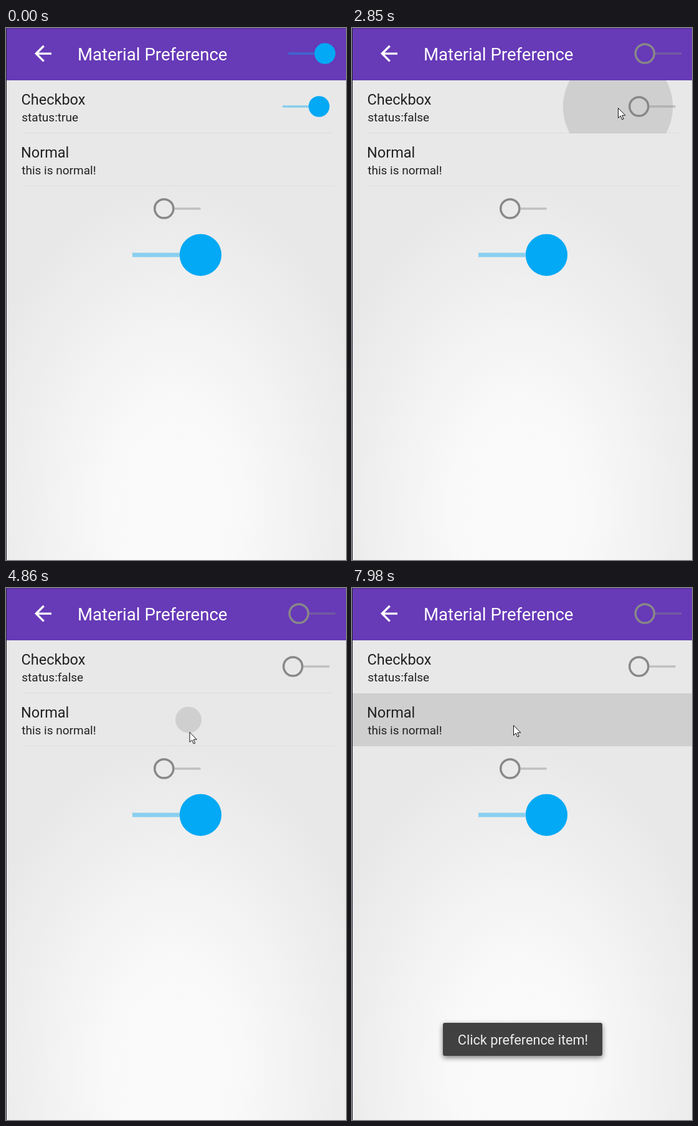
An HTML page that plays this animation: 546x854 px, repeating every 8000 ms.

```html
<!DOCTYPE html>
<html lang="en">
<head>
<meta charset="utf-8">
<title>Material Preference</title>
<style>
  html, body { margin: 0; width: 100%; height: 100%; overflow: hidden; }
  svg { display: block; }
  text { font-family: Roboto, sans-serif; fill: #212121; }
  .title { font-size: 23.5px; }
  .sub { font-size: 19px; }
  .divider { fill: #dedede; }
</style>
</head>
<body>
<svg id="stage" width="546" height="854" viewBox="0 0 546 854">
  <defs>
    <radialGradient id="glow" gradientUnits="userSpaceOnUse" cx="0" cy="0" r="520"
                    gradientTransform="translate(270 770) scale(.64 1)">
      <stop offset="0" stop-color="#fafafa"/>
      <stop offset=".32" stop-color="#f9f9f9"/>
      <stop offset="1" stop-color="#e8e8e8"/>
    </radialGradient>
    <filter id="shadow" x="-10%" y="-40%" width="120%" height="190%">
      <feDropShadow dx="0" dy="3" stdDeviation="4" flood-opacity=".55"/>
    </filter>
  </defs>

  <rect width="546" height="854" fill="url(#glow)"/>
  <rect width="546" height="84" fill="#673ab7"/>
  <rect width="546" height="2" fill="#5a34a3"/>
  <path transform="translate(39.2 20.8) scale(1.69)" fill="#fff"
        d="M20 11H7.83l5.59-5.59L12 4l-8 8 8 8 1.41-1.41L7.83 13H20z"/>
  <text x="115" y="52" style="font-size:27.6px;fill:#fff">Material Preference</text>

  <rect class="divider" x="25" y="168" width="499" height="1"/>
  <rect class="divider" x="25" y="253" width="499" height="1"/>
  <g id="ripples"></g>

  <text class="title" x="24.5" y="123">Checkbox</text>
  <text class="sub" x="25.3" y="149.5" id="status">status:true</text>
  <text class="title" x="24" y="208">Normal</text>
  <text class="sub" x="25.3" y="234.5">this is normal!</text>
  <g id="switches"></g>

  <g id="toast">
    <rect x="146" y="698" width="256" height="53" rx="3" fill="#313131" filter="url(#shadow)"/>
    <text x="274.5" y="733" text-anchor="middle" style="font-size:21.7px;fill:#ececec">Click preference item!</text>
  </g>
  <rect width="1" height="854" fill="#1c222c"/>
  <path id="cursor" d="M.5 .5V16.5L4.2 13L6.8 19L9.2 18L6.6 12.2H11.8Z" fill="#fff" stroke="#111" stroke-linejoin="round"/>
</svg>

<script>
const LOOP = 8000, FADE = 450, TOGGLE = 180;
const $ = id => document.getElementById(id);
const clamp = v => Math.max(0, Math.min(1, v));
const lerp = (a, b, p) => a + (b - a) * p;
const smooth = p => p * p * (3 - 2 * p);

function add(parent, tag, attrs = {}) {
  const el = document.createElementNS('http://www.w3.org/2000/svg', tag);
  set(el, attrs);
  parent.appendChild(el);
  return el;
}
function set(el, attrs) {
  for (const key in attrs) el.setAttribute(key, attrs[key]);
}

// Switches: left end, centre line, scale, initial state, toggle times
const rowToggles = [2040, 3200, 4120];
const switches = [
  { x: 453.5, y: 41, k: 1, on: true, times: [1110] },
  { x: 444, y: 126, k: 1, on: true, times: rowToggles },
  { x: 237, y: 290, k: 1, on: false, times: [] },
  { x: 203, y: 364.3, k: 2, on: true, times: [] }
];
for (const s of switches) {
  s.g = add($('switches'), 'g');
  s.track = add(s.g, 'path', { 'stroke-width': 3.5 * s.k, opacity: .42 });
  s.knob = add(s.g, 'circle', { cy: s.y, fill: 'none' });
}

function drawSwitch(s, t) {
  let on = s.on, p = +on;
  for (const start of s.times) {
    if (t < start) break;
    on = !on;
    const u = smooth(clamp((t - start) / TOGGLE));
    p = on ? u : 1 - u;
  }
  const R = 16.8 * s.k, right = s.x + (s.k === 2 ? 143 : 75.5);
  const cx = lerp(s.x + R, right - R, p);
  const width = lerp(3.5 * s.k, R, p);
  const mix = (a, b) => Math.round(lerp(a, b, p));
  s.g.setAttribute('stroke', `rgb(${mix(136, 3)},${mix(136, 169)},${mix(136, 244)})`);
  s.track.setAttribute('d', `M${s.x} ${s.y}H${cx - R}M${cx + R} ${s.y}H${right}`);
  set(s.knob, { cx, r: R - width / 2, 'stroke-width': width });
  return on;
}

// Ripples: row, centre, press time, release time
const ripples = [
  [0, 427, 2640, 3200], [0, 427, 3560, 4120],
  [1, 293, 4810, 5760], [1, 269.5, 5830, 5850], [1, 258, 6970, LOOP]
].map(([row, cx, press, release]) => {
  const box = add($('ripples'), 'svg', { x: 0, y: 84 + 85 * row, width: 546, height: 85 });
  return { row, press, release, el: add(box, 'circle', { cx, cy: 42.5 }) };
});
const dividers = document.querySelectorAll('.divider');

function drawRipples(t) {
  const busy = [false, false];
  for (const { row, press, release, el } of ripples) {
    const held = Math.max(0, Math.min(t, release) - press);
    const after = Math.max(0, t - release);
    const r = held * .42 + after * 1.04;
    const alpha = t < press ? 0 : .11 * (1 - clamp(after / FADE));
    set(el, { r, 'fill-opacity': alpha });
    if (alpha > 0 && r > 120) busy[row] = true;
  }
  dividers[0].style.opacity = busy[0] || busy[1] ? 0 : 1;
  dividers[1].style.opacity = busy[1] ? 0 : 1;
}

// Pointer stops: time, x, y
const stops = [
  [360, 300, 854], [1050, 494, 38], [1250, 494, 38], [1570, 490, 183], [1910, 484, 123],
  [2450, 484, 123], [2610, 427, 128], [4300, 427, 128], [4780, 294.5, 231], [5760, 294.5, 231],
  [5830, 270, 212], [6300, 270, 212], [6680, 265, 301], [6950, 259, 220], [LOOP, 259, 220]
];

function drawCursor(t) {
  $('cursor').style.display = t < 360 ? 'none' : '';
  const i = Math.max(1, stops.findIndex(s => s[0] > t));
  const [t0, x0, y0] = stops[i - 1], [t1, x1, y1] = stops[i];
  const p = smooth(clamp((t - t0) / (t1 - t0)));
  $('cursor').setAttribute('transform', `translate(${lerp(x0, x1, p)} ${lerp(y0, y1, p)})`);
}

function draw(now) {
  const t = now % LOOP;
  const on = switches.map(s => drawSwitch(s, t));
  $('status').textContent = 'status:' + on[1];
  drawRipples(t);
  drawCursor(t);
  const fadeIn = 1 - (1 - clamp((t - 5760) / 500)) ** 2;
  const fadeOut = clamp((t - 7840) / 500) ** 2;
  $('toast').style.opacity = fadeIn - fadeOut;
}

let start;
function tick(now) {
  start ??= now;
  draw(now - start);
  requestAnimationFrame(tick);
}
draw(0);
requestAnimationFrame(tick);
</script>
</body>
</html>
```
